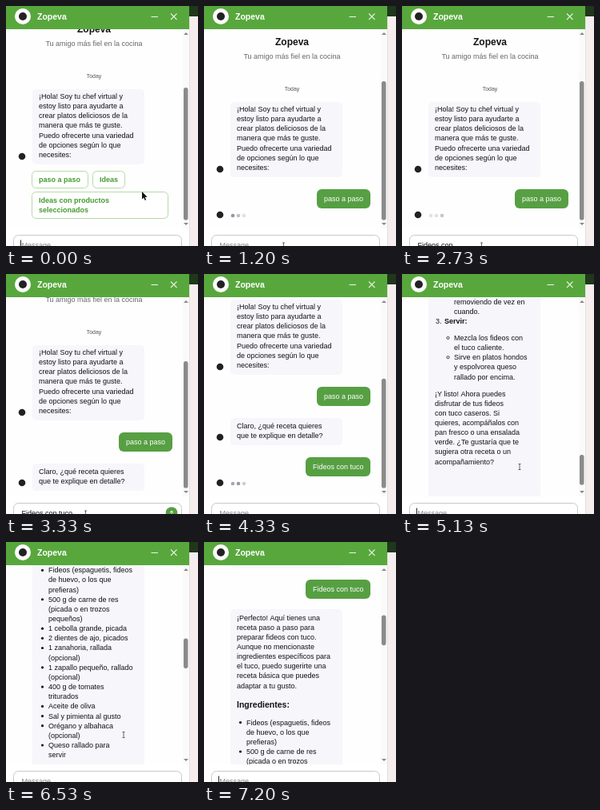
Animation, 240 px wide and 300 px high, one loop 7270 ms. Source, as an HTML page with a canvas:

```html
<!DOCTYPE html>
<html lang="es">
<head>
<meta charset="utf-8">
<title>Chat</title>
<style>
html, body { margin: 0; width: 100%; height: 100%; overflow: hidden; background: #fff; }
canvas { display: block; width: 240px; height: 300px; }
</style>
</head>
<body>
<canvas id="stage"></canvas>
<script>
const LOOP = 7270, LINE = 12.15, NAME = 'Zopeva';
const FONT = '"Liberation Sans", Arial, sans-serif';
const INK = '#131315', BUBBLE = '#f6f6fb', GREEN = '#58a73d', SENT = '#579f43';
// moments when the conversation changes
const PICK = 600, REPLY = 2750, SEND = 3700, RECIPE = 4600;

const canvas = document.getElementById('stage');
const ctx = canvas.getContext('2d');
const dpr = window.devicePixelRatio || 1;
canvas.width = 240 * dpr;
canvas.height = 300 * dpr;

const greeting = ['¡Hola! Soy tu chef virtual y', 'estoy listo para ayudarte a', 'crear platos deliciosos de la',
  'manera que más te guste.', 'Puedo ofrecerte una variedad', 'de opciones según lo que', 'necesites:'];
const question = ['Claro, ¿qué receta quieres', 'que te explique en detalle?'];
const order = 'Fideos con tuco';

// p paragraph, # heading, * bullet, 1 numbered step, o nested bullet; "/" breaks lines
const recipe = layout([
  'p¡Perfecto! Aquí tienes una/receta paso a paso para/preparar fideos con tuco./Aunque no mencionaste/ingredientes específicos para/el tuco, puedo sugerirte una/receta básica que puedes/adaptar a tu gusto.',
  '#Ingredientes:',
  '*Fideos (espaguetis, fideos/de huevo, o los que/prefieras)',
  '*500 g de carne de res/(picada o en trozos/pequeños)',
  '*1 cebolla grande, picada',
  '*2 dientes de ajo, picados',
  '*1 zanahoria, rallada/(opcional)',
  '*1 zapallo pequeño, rallado/(opcional)',
  '*400 g de tomates/triturados',
  '*Aceite de oliva',
  '*Sal y pimienta al gusto',
  '*Orégano y albahaca/(opcional)',
  '*Queso rallado para/servir',
  '#Instrucciones:',
  '1Cocinar los fideos:',
  'oLleva a ebullición una/olla grande con agua y/agrega sal.',
  'oCocina los fideos según/las instrucciones del/paquete hasta que/estén al dente. Luego/escúrrelos y resérvalos.',
  '1Preparar el tuco:',
  'oEn una sartén grande,/calienta un poco de/aceite de oliva a fuego/medio.',
  'oAgrega la cebolla picada/y sofríe hasta que esté/transparente.',
  'oAñade la zanahoria y el/zapallo (si lo usas) y/cocina por unos minutos/hasta que se ablanden.',
  'oIncorpora la carne y/cocina hasta que esté/dorada.',
  'oAgrega el ajo y cocina/un minuto más.',
  'oVierte el tomate triturado/y mezcla bien.',
  'oCondimenta con sal,/pimienta, orégano y/albahaca.',
  'oCocina a fuego lento/durante 20-30 minutos,/removiendo de vez en/cuando.',
  '1Servir:',
  'oMezcla los fideos con/el tuco caliente.',
  'oSirve en platos hondos/y espolvorea queso/rallado por encima.',
  'p¡Y listo! Ahora puedes/disfrutar de tus fideos/con tuco caseros. Si/quieres, acompáñalos con/pan fresco o una ensalada/verde. ¿Te gustaría que te/sugiera otra receta o un/acompañamiento?'
]);

function layout(blocks) {
  const rows = [];
  let y = 367.5, prev = '', step = 0;
  for (const block of blocks) {
    const kind = block[0];
    if (prev) {
      if (kind === '#') y += 24;
      else if (prev === '#') y += 22;
      else if (prev === '1' || kind === 'p') y += 21;
      else y += LINE;
    }
    block.slice(1).split('/').forEach((text, i) => {
      if (i) y += LINE;
      const mark = i ? '' : kind === '1' ? ++step + '.' : kind;
      rows.push({ kind, text, mark, y });
    });
    prev = kind;
  }
  return rows;
}

const smooth = u => u * u * (3 - 2 * u);

// piecewise path through [time, ...values]
function track(keys, t) {
  let i = keys.length - 1;
  while (i > 0 && keys[i][0] > t) i--;
  const a = keys[i], b = keys[i + 1];
  if (!b) return a.slice(1);
  const u = smooth((t - a[0]) / (b[0] - a[0]));
  return a.slice(1).map((v, k) => v + (b[k + 1] - v) * u);
}

const scrollKeys = [[PICK, 0], [REPLY, 0], [3000, 31], [SEND, 31], [3950, 88], [RECIPE, 88], [4950, 1182], [5080, 1182]];

function scrollAt(t) {
  if (t < PICK) return 16;
  if (t < 5080) return track(scrollKeys, t)[0];
  if (t < 5930) return 1182 - 426 * (t - 5080) / 850;
  const u = Math.min(1, (t - 5930) / 1220);
  return 756 - 486 * (1.25 * u - 0.25 * u ** 5);
}

function maxScroll(t) {
  return t < PICK ? 16 : t < REPLY ? 0 : t < SEND ? 31 : t < RECIPE ? 88 : 1182;
}

function write(text, x, y, { size = 9, color = INK, bold = false, align = 'left' } = {}) {
  ctx.font = (bold ? 'bold ' : '') + size + 'px ' + FONT;
  ctx.fillStyle = color;
  ctx.textAlign = align;
  ctx.fillText(text, x, y);
}

function box(x, y, w, h, r, fill, stroke) {
  ctx.beginPath();
  ctx.roundRect(x, y, w, h, r);
  if (fill) { ctx.fillStyle = fill; ctx.fill(); }
  if (stroke) { ctx.strokeStyle = stroke; ctx.lineWidth = 1; ctx.stroke(); }
}

function dot(x, y, r, fill, stroke) {
  ctx.beginPath();
  ctx.arc(x, y, r, 0, Math.PI * 2);
  if (fill) { ctx.fillStyle = fill; ctx.fill(); }
  if (stroke) { ctx.strokeStyle = stroke; ctx.lineWidth = 0.8; ctx.stroke(); }
}

function shape(points, fill) {
  ctx.beginPath();
  points.forEach(([x, y]) => ctx.lineTo(x, y));
  ctx.closePath();
  ctx.fillStyle = fill;
  ctx.fill();
}

function line(color, width, ...points) {
  ctx.beginPath();
  points.forEach(([x, y], i) => i ? ctx.lineTo(x, y) : ctx.moveTo(x, y));
  ctx.strokeStyle = color;
  ctx.lineWidth = width;
  ctx.stroke();
}

const avatar = y => dot(20, y, 4.3, '#222');

function botBubble(lines, top, height, base) {
  box(33, top, 140, height, 5, BUBBLE);
  lines.forEach((text, i) => write(text, 41, base + i * LINE));
}

function sentBubble(text, x, top) {
  box(x, top, 208 - x, 24, 6, SENT);
  write(text, x + 9, top + 15, { color: '#fff' });
}

function option(x, y, w, h, lines) {
  box(x + 0.5, y + 0.5, w - 1, h - 1, 5, '#fff', '#b5dba8');
  lines.forEach((text, i) => write(text, x + 9, y + 13.5 + i * LINE, { bold: true, color: '#439a2f' }));
}

function typing(y, t) {
  avatar(y - 1);
  for (let i = 0; i < 3; i++) {
    const wave = Math.max(0, Math.cos(2 * Math.PI * (t / 1000 - 0.22 - i * 0.16)));
    dot(36 + i * 7, y, 2.3, `rgba(110,105,125,${0.2 + 0.5 * wave})`);
  }
}

function drawRecipe(scroll, t) {
  box(33, 354, 140, 1102, 5, BUBBLE);
  avatar(1446);
  const left = { p: 41, '#': 41, '*': 53, 1: 53, o: 65 };
  for (const { kind, text, mark, y } of recipe) {
    if (y < scroll + 20 || y > scroll + 295) continue;
    const head = kind === '#';
    write(text, left[kind], y, { size: head ? 10.5 : 9, bold: head || kind === '1' });
    if (mark === '*') dot(45.5, y - 3, 1.6, INK);
    else if (mark === 'o') dot(57.5, y - 3, 1.6, null, INK);
    else if (kind === '1') write(mark, 42, y);
  }
  if (t > 5150 && t < 6700) write('11:10 pm', 178, 905, { size: 7.2, color: '#666' });
}

function drawChat(t) {
  const scroll = scrollAt(t);
  ctx.save();
  ctx.beginPath();
  ctx.rect(0, 29, 221, 249);
  ctx.clip();
  ctx.translate(0, -scroll);
  write(NAME, 110, 48.5, { size: 12, bold: true, align: 'center' });
  write('Tu amigo más fiel en la cocina', 110, 65.5, { color: '#666', align: 'center' });
  write('Today', 110, 106, { size: 6.9, color: '#555', align: 'center' });
  botBubble(greeting, 120, 94, 132);
  avatar(204);
  if (t < PICK) {
    option(32, 222, 71, 22, ['paso a paso']);
    option(108, 222, 41, 22, ['Ideas']);
    option(32, 248, 171, 34, ['Ideas con productos', 'seleccionados']);
  } else {
    sentBubble('paso a paso', 141, 229);
    if (t < REPLY) typing(262, t);
  }
  if (t >= REPLY) {
    botBubble(question, 268, 34, 281);
    avatar(292);
  }
  if (t >= SEND) {
    sentBubble(order, 127, 317);
    if (t < RECIPE) typing(350, t);
    else drawRecipe(scroll, t);
  }
  ctx.restore();

  // scrollbar
  const total = maxScroll(t) + 327;
  ctx.fillStyle = '#fafafa';
  ctx.fillRect(221, 29, 8, 249);
  shape([[222, 36], [228, 36], [225, 33]], '#888');
  shape([[222, 271], [228, 271], [225, 274]], '#888');
  box(222, 38.6 + (scroll + 79) / total * 229, 5.5, 248 / total * 229, 2.7, '#8a8a8a');
}

function drawHeader() {
  ctx.fillStyle = GREEN;
  ctx.fillRect(0, 0, 229, 29);
  dot(21, 13, 10, '#fff');
  dot(21, 13, 5, '#222');
  write(NAME, 39, 16.5, { size: 10.5, bold: true, color: '#fff' });
  line('#e4f2df', 1.1, [181.5, 13.5], [190, 13.5]);
  line('#e4f2df', 1.1, [206, 9.5], [213.5, 17]);
  line('#e4f2df', 1.1, [213.5, 9.5], [206, 17]);
}

function drawInput(t) {
  ctx.fillStyle = '#fff';
  ctx.fillRect(0, 278, 229, 22);
  box(9.5, 286.5, 210, 34, 6, '#fff', '#c9c9c9');
  const count = t < SEND ? Math.max(0, Math.min(order.length, Math.floor((t - 1450) / 122))) : 0;
  const typed = order.slice(0, count);
  if (typed) write(typed, 19.5, 301.5);
  else write('Message...', 19.5, 301.5, { color: '#858585' });
  const focused = t < 500 || t > 1350;
  if (focused && t % 1000 < 310) {
    const x = typed ? 20 + ctx.measureText(typed).width : 18.5;
    line('#222', 1, [x, 292.5], [x, 300]);
  }
  if (t >= REPLY && t < SEND) {
    dot(207, 298.5, 7.3, SENT);
    line('#fff', 1, [207, 301.5], [207, 296]);
    line('#fff', 1, [204.8, 298.2], [207, 296], [209.2, 298.2]);
  }
}

const mouseKeys = [[0, 170, 232], [430, 72, 217], [680, 72, 217], [1130, 99.5, 299.5], [3380, 99.5, 299.5], [3650, 207, 298],
  [3800, 207, 298], [4050, 207, 312], [4600, 150, 312], [5050, 147, 241], [6650, 147, 241], [7050, 150, 312]];

function drawMouse(t) {
  const [x, y] = track(mouseKeys, t);
  const arrow = t < 950 || (t > 3500 && t < 4600);
  if (arrow) {
    const tip = [[0, 0], [0, 9.5], [2.2, 7.5], [3.8, 11], [5.2, 10.3], [3.7, 7], [6.6, 6.8]];
    shape(tip.map(([a, b]) => [x + a, y + b]), '#111');
  } else {
    line('#444', 0.8, [x, y - 3.5], [x, y + 3.5]);
    line('#444', 0.8, [x - 1.5, y - 3.5], [x + 1.5, y - 3.5]);
    line('#444', 0.8, [x - 1.5, y + 3.5], [x + 1.5, y + 3.5]);
  }
}

function drawEdge() {
  ctx.fillStyle = '#f6eeee';
  ctx.fillRect(229, 0, 11, 300);
  ctx.fillStyle = '#20371c';
  ctx.fillRect(229, 0, 11, 13);
  ctx.fillStyle = '#e6e0e0';
  ctx.fillRect(229, 13, 1, 287);
}

function draw(t) {
  ctx.setTransform(dpr, 0, 0, dpr, 0, 0);
  ctx.fillStyle = '#fefefe';
  ctx.fillRect(0, 0, 240, 300);
  drawChat(t);
  drawHeader();
  drawInput(t);
  drawEdge();
  drawMouse(t);
}

const start = performance.now();
function frame() {
  draw((performance.now() - start) % LOOP);
  requestAnimationFrame(frame);
}
frame();
</script>
</body>
</html>
```
